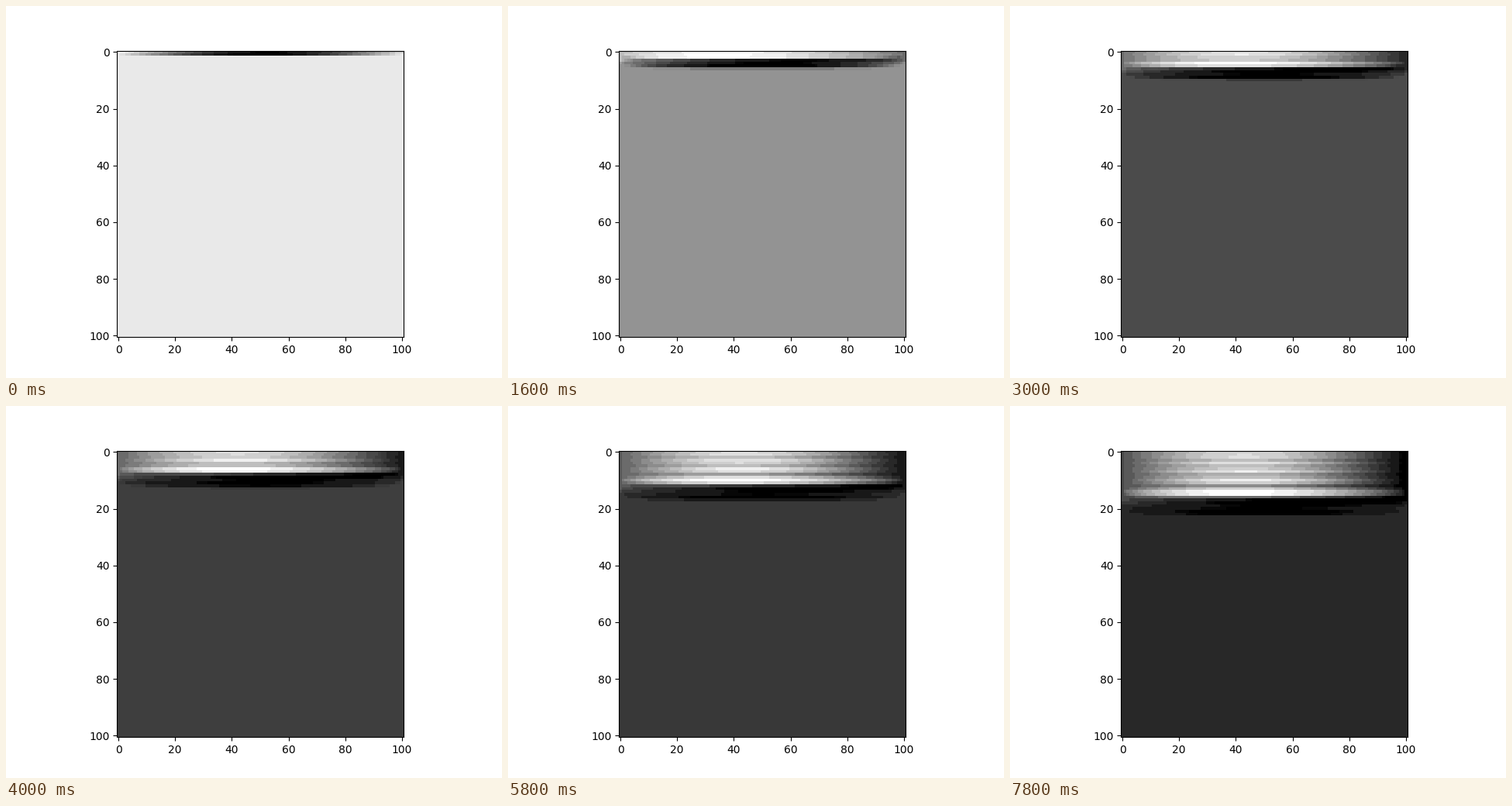
Animation of 640 by 480 pixels, one loop 8000 ms. Source, as a matplotlib script:

```python
import numpy as np
import matplotlib.pyplot as plt
from matplotlib.animation import FuncAnimation

SIZE = 101
FRAMES = 40
INTERVAL = 200

row, col = np.mgrid[0:SIZE, 0:SIZE].astype(float)
x = col / (SIZE - 1)
arch = np.clip(np.sin(np.pi * x), 0, 1)

# Grey level of the still water as the colour range rescales.
REST_STEPS = [0, 8, 15, 20, 29, 34, 39]
REST_LEVELS = [0.913, 0.58, 0.295, 0.243, 0.224, 0.16, 0.16]


def smooth_step(z, start, end):
    t = np.clip((z - start) / (end - start), 0, 1)
    return t * t * (3 - 2 * t)


def bump(z, center, width):
    return np.exp(-((z - center) / width) ** 2)


def ripples(z, n):
    """Dispersive ripples trailing the crest, settling to a plateau of 1."""
    d = np.maximum(-z, 1.0)
    wave = -0.564 * d ** -0.75 * np.cos(2 / 3 * d ** 1.5 + np.pi / 4)
    deepen = 2.6 * (1 - np.exp(-n / 20))
    wave = np.where(wave < 0, wave * max(deepen, 1), wave)
    fade = np.where(z < -3, 1 - np.exp(-row / 1.5), 1)
    return 1 + wave * fade


def trough(z, n):
    """Shallow dip that runs ahead of the crest, darkest at both its ends."""
    end = 2.9 + 0.025 * n
    base = 0.88 - 0.005 * n
    depth = base + (1 - base) * (bump(z, 0.3, 0.55) + bump(z, end - 0.7, 0.5))
    rise = 0.5 * (1 + np.tanh((z + 0.8) / 0.3))
    fall = 0.5 * (1 - np.tanh((z - end) / 0.45))
    return depth * rise * fall


def posterize(v):
    stepped = 0.094 + 0.065 * np.round((v - 0.094) / 0.065)
    return np.clip(np.where(v < 0.05, 0, stepped), 0, 1)


def field(n):
    t = max(n, 1)
    rest = np.interp(n, REST_STEPS, REST_LEVELS)
    front = 0.455 * t - 0.35
    scale = 0.392 * t ** (1 / 3)
    z = (row - front) / scale
    z_dip = z + 1.2 * np.abs(2 * x - 1) ** 6 * min(n / 8, 1) / scale

    crest = bump(z, -2.3, 1.0)
    swell = (1 - rest) / 1.27 * ripples(z, n) * smooth_step(z, -0.35, -1.9)
    swell = swell * arch ** (1 - 0.4 * crest)
    dip = 1.06 * rest * trough(z_dip, n) * arch ** (1 - 0.4 * min(n / 8, 1))
    tilt = (0.087 + 0.065 * min(n / 8, 1)) * np.cos(np.pi * x)
    tilt = tilt * smooth_step(z, 2, -1)

    u = swell - dip + tilt
    return np.where(np.abs(u) < 0.012, rest, posterize(rest + u))


fig, ax = plt.subplots(figsize=(6.4, 4.8), dpi=100)
image = ax.imshow(field(0), cmap="gray", vmin=0, vmax=1,
                  interpolation="nearest")


def update(n):
    image.set_data(field(n))
    return [image]


anim = FuncAnimation(fig, update, frames=FRAMES, interval=INTERVAL,
                     repeat=True, repeat_delay=0, blit=False)
plt.show()
```
